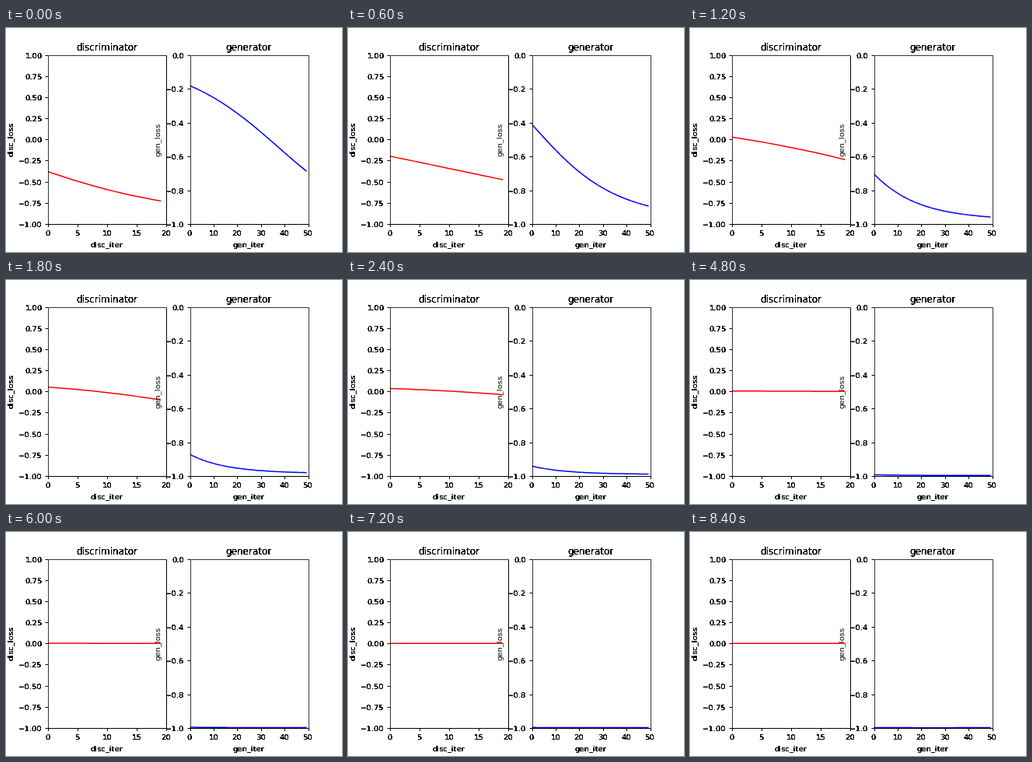
An HTML page for the animation above (9000 ms loop, 432x288 px).

```html
<!DOCTYPE html>
<html lang="en">
<head>
<meta charset="utf-8">
<title>Training losses</title>
<style>
html, body { margin: 0; width: 100%; height: 100%; overflow: hidden; background: #fff; }
svg { display: block; width: 432px; height: 288px; }
text { font-family: "DejaVu Sans", sans-serif; fill: #000; text-rendering: geometricPrecision; }
path { fill: none; }
</style>
</head>
<body>
<svg id="stage" viewBox="0 0 432 288">
  <filter id="harden" filterUnits="userSpaceOnUse" x="0" y="0" width="432" height="288">
    <feComponentTransfer><feFuncA type="linear" slope="6" intercept="-1"/></feComponentTransfer>
  </filter>
</svg>
<script>
const NS = "http://www.w3.org/2000/svg";
const stage = document.getElementById("stage");
const STEP = 600, LOOP = 9000;
const TOP = 34.56, BOTTOM = 252, WIDTH = 152.18;
const X_HEIGHT = 0.547;

function add(tag, attrs, parent = stage) {
  const el = document.createElementNS(NS, tag);
  for (const key in attrs) el.setAttribute(key, attrs[key]);
  parent.appendChild(el);
  return el;
}

// Overprinted text has hard edges, so it goes through a filter.
const hardText = add("g", { filter: "url(#harden)" });

// align: 0 start, 0.5 middle, 1 end. The x-height is fitted to whole pixels.
function label(str, x, y, align, { size = 10, turn = false, parent = hardText } = {}) {
  const el = add("text", { "font-size": size }, parent);
  el.textContent = str;
  const shift = el.getComputedTextLength() * align;
  const fit = Math.round(size * X_HEIGHT) / (size * X_HEIGHT);
  const place = turn
    ? `translate(${x} ${Math.round(y + shift) + 1}) rotate(-90)`
    : `translate(${Math.round(x - shift)} ${y})`;
  el.setAttribute("transform", `${place} scale(1 ${fit})`);
  el.setAttribute("dx", "0 -1");
}

const snap = v => Math.floor(v + 0.5) + 0.5;
const signed = (v, digits) => (v < 0 ? "\u2212" : "") + Math.abs(v).toFixed(digits);

function plot(o) {
  const px = v => o.left + v / o.xMax * WIDTH;
  const py = v => TOP + (o.yMax - v) / (o.yMax + 1) * (BOTTOM - TOP);
  const clip = add("clipPath", { id: o.title });
  add("rect", { x: o.left, y: TOP, width: WIDTH, height: BOTTOM - TOP + 0.5 }, clip);
  const line = add("path", {
    stroke: o.color, "stroke-width": 1.5, "stroke-linejoin": "round",
    "stroke-linecap": "square", "clip-path": `url(#${o.title})`
  });

  const x0 = snap(o.left), x1 = snap(o.left + WIDTH), y0 = snap(TOP), y1 = snap(BOTTOM);
  const stroke = (d, width) => add("path", { d, stroke: "#000", "stroke-width": width });
  stroke(`M${x0} ${y1}V${y0}H${x1}`, 0.8);
  stroke(`M${x1} ${y0}V${y1}`, o.rightWidth);

  let hard = `M${x0 - 0.5} ${y1}H${x1 + 0.5}`;
  for (let v = 0; v <= o.xMax; v += o.xTick) {
    hard += `M${snap(px(v))} ${y1}v3.5`;
    label(String(v), px(v), 267, 0.5);
  }
  const count = Math.round((o.yMax + 1) / o.yTick);
  for (let i = 0; i <= count; i++) {
    const v = (i - count) * o.yTick + o.yMax, y = py(v);
    hard += `M${x0 - 0.5} ${snap(y)}h-3.5`;
    label(signed(v, o.digits), o.left - 7, Math.round(y + 4), 1);
  }
  stroke(hard, 1);

  const mid = o.left + WIDTH / 2;
  label(o.title, mid, 29, 0.5, { size: 12 });
  label(o.xName, mid, 282, 0.5);
  label(o.yName, o.yNameX, (TOP + BOTTOM) / 2, 0.5, { turn: true, parent: o.yNameParent });

  return k => {
    const pts = [];
    for (let i = 0; i < o.xMax; i++) {
      const v = o.loss(k, i / (o.xMax - 1));
      pts.push(px(i).toFixed(2) + " " + py(v).toFixed(2));
    }
    line.setAttribute("d", "M" + pts.join("L"));
  };
}

const { exp } = Math;
const mix = (a, b, t) => a + (b - a) * t;
const bow = t => 4 * t * (1 - t);

// Both ends of each curve settle towards 0 as the rounds k go on.
function discLoss(k, t) {
  const from = 0.215 * 0.63 ** k - 0.595 * exp(-0.58 * k * k);
  const to = -0.727 * exp(-0.425 * k ** 1.4);
  const bend = 0.03 * (k - 1) * exp(-0.15 * k * k);
  return mix(from, to, t) + bend * bow(t);
}

// A sigmoid whose argument climbs along the curve and from round to round.
function genLoss(k, t) {
  const from = 6.6 - 8.1 * exp(-k / 5.2) - 0.693 * k * exp(-0.93 * k);
  const to = 6.15 - 5.37 * 0.75 ** k;
  const bend = 0.35 - 0.42 * exp(-0.8 * k);
  return -1 / (1 + exp(-mix(from, to, t) - bend * bow(t)));
}

const plots = [
  plot({
    title: "discriminator", xName: "disc_iter", yName: "disc_loss", yNameX: 9, yNameParent: hardText,
    left: 54, rightWidth: 1, xMax: 20, xTick: 5, yMax: 1, yTick: 0.25, digits: 2,
    color: "#f00", loss: discLoss
  }),
  plot({
    title: "generator", xName: "gen_iter", yName: "gen_loss", yNameX: 198, yNameParent: stage,
    left: 236.62, rightWidth: 0.8, xMax: 50, xTick: 10, yMax: 0, yTick: 0.2, digits: 1,
    color: "#00f", loss: genLoss
  })
];

function tick() {
  const k = Math.floor(performance.now() % LOOP / STEP);
  plots.forEach(draw => draw(k));
  requestAnimationFrame(tick);
}
tick();
</script>
</body>
</html>
```
